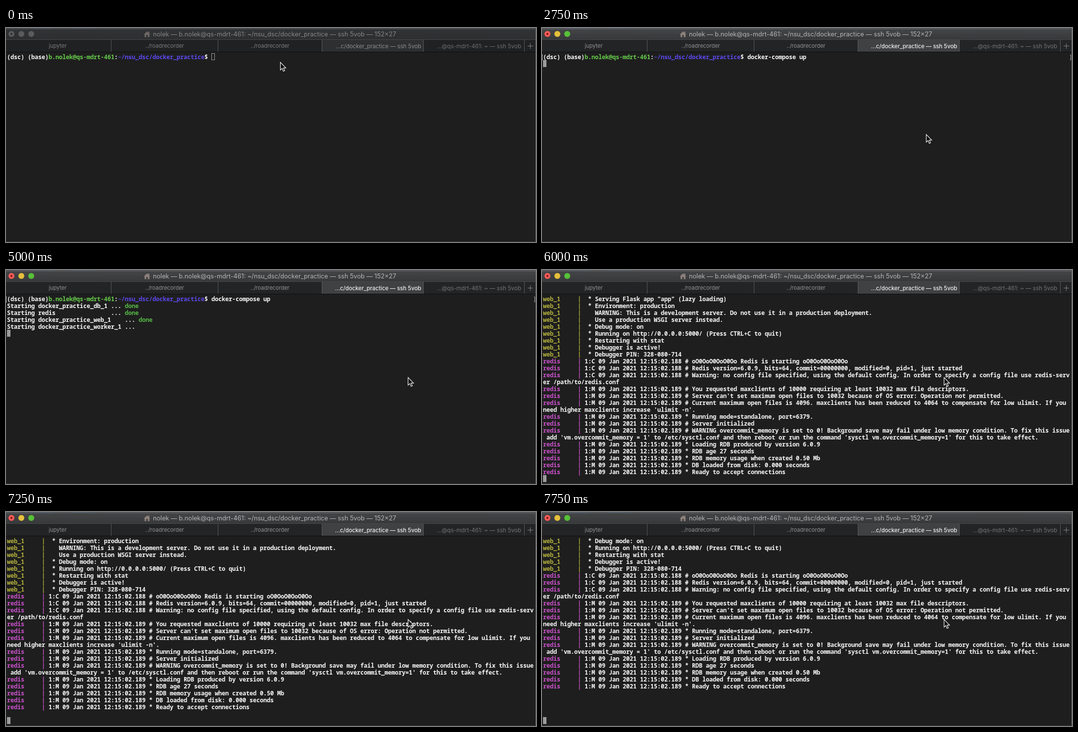
An HTML page with a canvas that plays this animation: 1071x433 px, repeating every 8 s.

```html
<!DOCTYPE html>
<html lang="en">
<head>
<meta charset="utf-8">
<title>Terminal</title>
<style>
html, body { margin: 0; width: 100%; height: 100%; overflow: hidden; background: #1e1e1e; }
canvas { display: block; }
</style>
</head>
<body>
<canvas id="stage" width="1071" height="433"></canvas>
<script>
const W = 1071, H = 433, LOOP = 8000, COLS = 152;
const CELL = 7, ROW = 14, LEFT = 2, TOP = 51;
const WHITE = '#f8f8f8', GREEN = '#66cc4a', DONE = '#55b845', BLUE = '#5d48f0',
      YELLOW = '#b3b03c', PINK = '#cb52cb', BLOCK = '#9b9b9b';
const USER = 'b.nolek', HOST = 'qs-mdrt-461', DIR = '~/nsu_dsc/docker_practice';
const ctx = document.getElementById('stage').getContext('2d');

const WEB = [
  ' * Serving Flask app "app" (lazy loading)',
  ' * Environment: production',
  '   WARNING: This is a development server. Do not use it in a production deployment.',
  '   Use a production WSGI server instead.',
  ' * Debug mode: on',
  ' * Running on http://0.0.0.0:5000/ (Press CTRL+C to quit)',
  ' * Restarting with stat',
  ' * Debugger is active!',
  ' * Debugger PIN: 328-080-714'
];
const REDIS = [
  '# oO0OoO0OoO0Oo Redis is starting oO0OoO0OoO0Oo',
  '# Redis version=6.0.9, bits=64, commit=00000000, modified=0, pid=1, just started',
  '# Warning: no config file specified, using the default config. In order to specify a config file use redis-server /path/to/redis.conf',
  '# You requested maxclients of 10000 requiring at least 10032 max file descriptors.',
  "# Server can't set maximum open files to 10032 because of OS error: Operation not permitted.",
  "# Current maximum open files is 4096. maxclients has been reduced to 4064 to compensate for low ulimit. If you need higher maxclients increase 'ulimit -n'.",
  '* Running mode=standalone, port=6379.',
  '# Server initialized',
  "# WARNING overcommit_memory is set to 0! Background save may fail under low memory condition. To fix this issue add 'vm.overcommit_memory = 1' to /etc/sysctl.conf and then reboot or run the command 'sysctl vm.overcommit_memory=1' for this to take effect.",
  '* Loading RDB produced by version 6.0.9',
  '* RDB age 27 seconds',
  '* RDB memory usage when created 0.50 Mb',
  '* DB loaded from disk: 0.000 seconds',
  '* Ready to accept connections'
];

// Wraps one log line to rows of [text, colour] spans.
function logRows(name, colour, text) {
  const head = name.padEnd(10) + '|', room = COLS - head.length;
  const rows = [[[head, colour], [text.slice(0, room), WHITE]]];
  for (let i = room; i < text.length; i += COLS)
    rows.push([[text.slice(i, i + COLS), WHITE]]);
  return rows;
}
const LOG = [
  ...WEB.flatMap(s => logRows('web_1', YELLOW, ' ' + s)),
  ...REDIS.flatMap((s, i) => logRows('redis', PINK,
    i < 3 ? ` 1:C 09 Jan 2021 12:15:02.188 ${s}` : ` 1:M 09 Jan 2021 12:15:02.189 ${s}`))
];

// Latest value of a [time, value] list.
const at = (steps, t) => steps.filter(s => s[0] <= t).pop()[1];

const POINTER = [[0, [554, 69]], [250, [521, 121]], [750, [776, 215]], [4250, [812, 217]]];
const COMMAND = [[0, ''], [1250, 'clear'], [1750, 'docker-compose up']];
const SCROLL = [[0, 0], [7250, 1], [7500, 2], [7750, 4]];

// [shown at, done at, name, width of the name column]
const SERVICES = [
  [3000, 4500, 'docker_practice_db_1', 30],
  [3000, 3500, 'redis', 30],
  [4500, 5000, 'docker_practice_web_1', 34],
  [4500, Infinity, 'docker_practice_worker_1', 34]
];

function box(x, y, w, h, colour) {
  ctx.fillStyle = colour;
  ctx.fillRect(x, y, w, h);
}

function disc(x, y, r, colour) {
  ctx.fillStyle = colour;
  ctx.beginPath();
  ctx.arc(x, y, r, 0, 7);
  ctx.fill();
}

function label(text, x, y, size, colour, align = 'left', weight = 400) {
  ctx.font = `${weight} ${size}px Inter, Roboto, sans-serif`;
  ctx.textAlign = align;
  ctx.fillStyle = colour;
  ctx.fillText(text, x, y);
}

function cells(spans, row, weight = 600) {
  ctx.font = `${weight} 12px "Noto Sans Mono", "DejaVu Sans Mono", monospace`;
  ctx.textAlign = 'left';
  let col = 0;
  for (const [text, colour] of spans) {
    ctx.fillStyle = colour;
    for (const ch of text) {
      if (ch !== ' ') ctx.fillText(ch, LEFT + col * CELL, TOP + 12 + row * ROW);
      col++;
    }
  }
}

function caret(col, row) {
  box(LEFT + col * CELL, TOP + row * ROW, CELL, ROW, BLOCK);
}

function path(points) {
  ctx.beginPath();
  points.forEach(([x, y]) => ctx.lineTo(x, y));
  ctx.closePath();
}

function chrome(active) {
  box(0, 0, W, 1, '#2a2c30');
  box(50, 0, 46, 1, '#26384f');
  box(131, 0, 48, 1, '#26384f');
  const bar = ctx.createLinearGradient(0, 2, 0, 24);
  bar.addColorStop(0, active ? '#444547' : '#323335');
  bar.addColorStop(1, active ? '#37383a' : '#2d2e30');
  box(0, 1, W, 23, bar);
  box(0, 1, W, 1, active ? '#808183' : '#6a6b6c');

  const lights = active ? ['#fc5b57', '#e5bf3c', '#57c038'] : Array(3).fill('#5a5b5c');
  lights.forEach((colour, i) => disc(11 + 20 * i, 12, 6, colour));
  disc(11, 12, 2, active ? '#6e1512' : '#252627');

  ctx.fillStyle = active ? '#8d817b' : '#6c6765';
  path([[278.5, 13], [285, 7], [287.5, 9], [287.5, 7], [289.5, 7], [289.5, 11], [291.5, 13],
    [290, 13], [290, 18.5], [286.5, 18.5], [286.5, 14], [283.5, 14], [283.5, 18.5], [280, 18.5], [280, 13]]);
  ctx.fill();
  label(`nolek — ${USER}@${HOST}: ${DIR} — ssh 5vob — 152×27`, 297, 17, 12.7, active ? '#b5b6b7' : '#858687');

  box(0, 24, W, 25, active ? '#232425' : '#202122');
  box(639, 24, 204, 24, active ? '#404143' : '#2e2f30');
  box(0, 23, W, 1, '#48494a');
  box(0, 48, W, 1, '#0e0e0e');
  [212, 428, 638, 843, 1047].forEach(x => box(x, 24, 1, 24, '#58595a'));
  const dim = active ? '#929394' : '#7b7c7d';
  label('jupyter', 104.5, 40, 11, dim, 'center');
  label('../roadrecorder', 320.5, 40, 11, dim, 'center');
  label('../roadrecorder', 533.5, 40, 11, dim, 'center');
  label('…c/docker_practice — ssh 5vob', 839, 40.5, 11.3, active ? '#f0f0f0' : '#8c8d8e', 'right', active ? 500 : 400);
  label(`…@${HOST}: ~ — ssh 5vob`, 1041, 40.5, 11.5, active ? '#737475' : '#6d6e6f', 'right');
  box(1054, 36, 11, 1, '#838485');
  box(1059, 31, 1, 11, '#838485');
}

function session(t) {
  const command = at(COMMAND, t), sent = t >= 2750;
  cells([['(dsc) (base)', WHITE], [`${USER}@${HOST}`, GREEN], [':', WHITE], [DIR, BLUE], ['$', WHITE]], 0, 700);
  cells([[' '.repeat(59) + command, WHITE]], 0);
  if (t < 500) {
    ctx.strokeStyle = BLOCK;
    ctx.strokeRect(415.5, 51.5, 6, 13);
  } else if (!sent) {
    caret(59 + command.length, 0);
  }
  if (!sent) return;

  for (const [x, tick] of [[0, 0], [1068, 1067]]) {
    box(x, 54, 1, 11, '#b0b0b0');
    [54, 64].forEach(y => box(tick, y, 2, 1, '#b0b0b0'));
  }
  const shown = SERVICES.filter(s => t >= s[0]);
  shown.forEach(([, done, name, width], i) =>
    cells([[`Starting ${name}`.padEnd(width) + '... ', WHITE], [t >= done ? 'done' : '', DONE]], i + 1));
  caret(0, shown.length + 1);
}

function pointer([x, y]) {
  path([[0, 0], [0, 15.5], [3.6, 12.2], [6, 18], [8.6, 17], [6.2, 11.3], [11, 11.3]]
    .map(([dx, dy]) => [x + .5 + dx, y + .5 + dy]));
  ctx.fillStyle = '#0a0a0a';
  ctx.fill();
  ctx.strokeStyle = '#f2f2f2';
  ctx.lineWidth = 1.2;
  ctx.stroke();
  ctx.lineWidth = 1;
}

function draw() {
  const t = performance.now() % LOOP;
  box(0, 0, W, H, '#1e1e1e');
  if (t < 6000) {
    session(t);
  } else {
    LOG.slice(at(SCROLL, t)).forEach((spans, row) => cells(spans, row));
    caret(0, 26);
  }
  chrome(t >= 250);
  box(W - 1, 2, 1, H, '#6c6c6c');
  box(0, H - 1, W, 1, '#3a3a3a');
  pointer(at(POINTER, t));
  requestAnimationFrame(draw);
}
draw();
</script>
</body>
</html>
```
